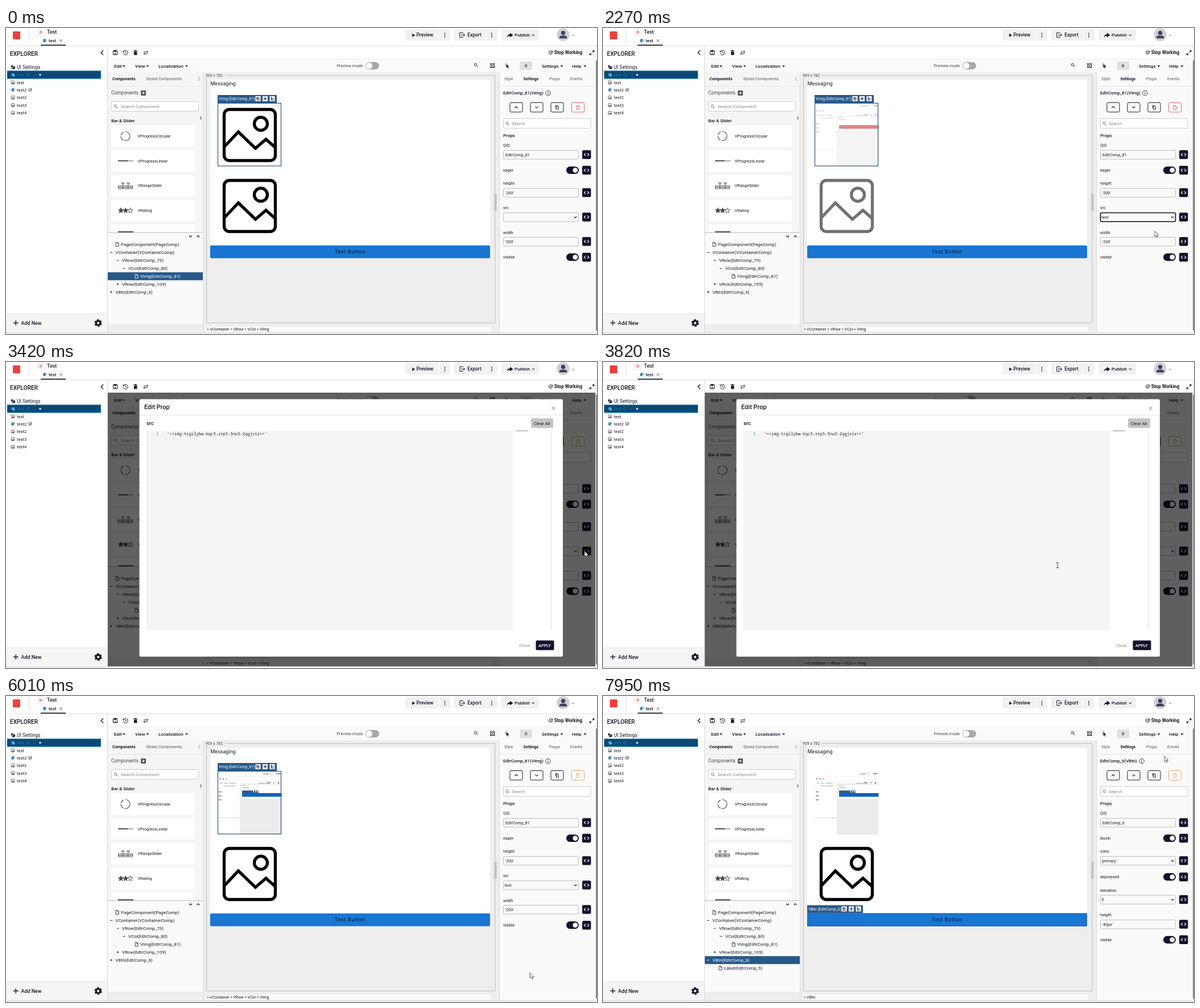
An HTML page that plays this animation: 1039 px wide and 539 px high, repeating every 8 s.

```html
<!DOCTYPE html>
<html lang="en">
<head>
<meta charset="utf-8">
<title>Editor</title>
<style>
html, body { margin: 0; width: 100%; height: 100%; overflow: hidden; background: #fff; }
svg { display: block; width: 100%; height: 100%; font-family: Roboto, sans-serif; --del: #e0605c; }
text { white-space: pre; }
.m { font-weight: 500; }
.b { font-weight: 700; }
</style>
</head>
<body>
<svg id="stage" viewBox="0 0 1039 539" preserveAspectRatio="none"></svg>
<script>
const INK = '#16162a', NAVY = '#11112c', BLUE = '#28598a';
const stage = document.getElementById('stage');

// ---- drawing helpers ----
const R = (x, y, w, h, f, o = '') => `<rect x="${x}" y="${y}" width="${w}" height="${h}" fill="${f}" ${o}/>`;
const box = (x, y, w, h, c, o = '', f = 'none') => R(x, y, w, h, f, `stroke="${c}" ${o}`);
const C = (x, y, r, f, o = '') => `<circle cx="${x}" cy="${y}" r="${r}" fill="${f}" ${o}/>`;
const L = (d, c = INK, w = 1, o = '') => `<path d="${d}" fill="none" stroke="${c}" stroke-width="${w}" ${o}/>`;
const F = (d, f = INK, o = '') => `<path d="${d}" fill="${f}" ${o}/>`;
const esc = s => s.replace(/&/g, '&amp;').replace(/</g, '&lt;').replace(/>/g, '&gt;');
const T = (x, y, s, str, c = INK, o = '') =>
  `<text x="${x}" y="${(y + s * .355).toFixed(2)}" font-size="${s}" fill="${c}" ${o}>${esc(str)}</text>`;
const G = (id, body, o = '') => `<g id="${id}" ${o}>${body}</g>`;
const M = 'class="m"', B = 'class="b"', MONO = 'font-family="Noto Sans Mono, monospace"';
const chev = (x, y, s, up, c = INK, w = 1.1) => L(`M${x - s} ${y + (up ? s / 2 : -s / 2)}l${s} ${up ? -s : s} ${s} ${up ? s : -s}`, c, w);
const caret = (x, y) => F(`M${x - 2.5} ${y - 1}h5l-2.5 2.7z`);
const cross = (x, y, s, c, w = 1) => L(`M${x - s} ${y - s}l${2 * s} ${2 * s}m0 ${-2 * s}l${-2 * s} ${2 * s}`, c, w);
const plus = (x, y, s, c = INK, w = 1.1) => L(`M${x - s} ${y}h${2 * s}M${x} ${y - s}v${2 * s}`, c, w);
const lens = (x, y, c, w = 1) => C(x - 1, y - 1, 2.2, 'none', `stroke="${c}" stroke-width="${w}"`) + L(`M${x + .7} ${y + .7}l2.5 2.5`, c, w);
const palette = (x, y, c) => C(x, y, 3, c) + C(x - 1.2, y - 1, .6, '#fff') + C(x + 1.1, y - 1.1, .6, '#fff') + C(x + 1.8, y + 1.5, 1, '#fff');
const pic = (x, y) => box(x - 2.7, y - 2.7, 5.6, 5.4, '#444', 'rx=".6" stroke-width=".8"') + F(`M${x - 2} ${y + 1.8}l1.4-2 1 1 1-1.4 1.2 2.4z`, '#444');
const dots = (x, y) => [-3, 0, 3].map(d => C(x, y + d, .9, INK)).join('');
const copy = (x, y, s, c) => L(`M${x - s} ${y + s * .5}v${-1.5 * s}h${1.3 * s}`, c, .9) + box(x - s * .5, y - s * .5, s * 1.3, s * 1.6, c, 'stroke-width=".9"');
const bin = (x, y) => `<path d="M${x - 3.2} ${y - 2.6}h6.4M${x - 1} ${y - 3.8}h2M${x - 2.3} ${y - 2.4}v6h4.6v-6" fill="none" style="stroke:var(--del)"/>`;
const sheet = (x, y, c) => L(`M${x - 2.5} ${y - 3.5}h3l2.2 2.2v4.9h-5.2zM${x + .4} ${y - 3.4}v2.3h2.2`, c, .8);

function header() {
  return R(12, 6, 13, 14, '#e8433f', 'rx="1"') + L('M40.5 0V26', '#dcdcdc') +
    box(55.5, 1.5, 11.5, 11.5, '#e2e2e2', 'rx="1"') + C(61.2, 7.2, 3, '#f1aaa5') +
    T(72, 7, 8.9, 'Test', INK, M) + palette(68, 22, '#1b7fc4') + T(75, 22, 7.8, 'test', INK, M) +
    cross(96.5, 22.3, 2.2, '#444', .9) + R(61, 29.4, 44, 1.6, INK) +
    R(702, 2, 79, 20, '#f1f1f1', 'rx="2"') + F('M714.2 9.7v6l4.9-3z') + T(721.5, 12.5, 8.4, 'Preview', INK, M) +
    L('M761.5 2v20', '#fff') + dots(771.5, 12.5) +
    R(788, 2, 76, 20, '#f1f1f1', 'rx="2"') + L('M803 9.5v-1.3h-5.2v8.4h5.2v-1.3M800 12.4h6.5m-2.2-2.2l2.2 2.2-2.2 2.2') +
    T(811.3, 12.5, 8.4, 'Export', INK, M) + L('M844.5 2v20', '#fff') + dots(854, 12.5) +
    R(871, 2, 66, 20, '#f1f1f1', 'rx="2"') + F('M886 8.5l5.5 4-5.5 4v-2.4q-3.6-.2-5.5 2.2.6-4.7 5.5-5.4z') +
    T(894, 12.5, 8.1, 'Publish', INK, M) + chev(927, 12.5, 2.2, 0, '#444') +
    C(979.5, 11.8, 11.2, '#cfcfd3') + C(979.5, 8.8, 3.7, '#3c4063') + F('M972.5 18.3q0-4.8 4.5-4.8h5q4.5 0 4.5 4.8z', '#3c4063') +
    chev(997, 12.8, 2, 0, '#999') + L('M0 31.5H1039', '#dedede');
}

function sidebar() {
  const rows = [[69, 'UI Settings', 8.6], [96, 'test', 7.6], [109, 'test2', 7.6], [122.5, 'test2', 7.6], [136, 'test3', 7.6], [149.5, 'test4', 7.6]];
  return T(7, 45, 10.1, 'EXPLORER', INK, M) + L('M171 39.5l-4 4 4 4', INK, 1.3) +
    R(2, 75.4, 165, 14, '#0a4976') + L('M2 75.9h164.5v13H2', '#0b76b8') +
    palette(12.3, 82.5, '#2b93d6') + T(19, 82.5, 7.6, 'test', '#1c72ab') + C(39, 82.5, 2.5, 'none', 'stroke="#1c72ab"') +
    L('M48 85l4-4.5', '#1c72ab') + C(60, 82.3, 1.6, '#fff') +
    F('M9 66h2.7l1 1h3v1.3h-5l-1.7 3zM10.3 72l1.5-3h5l-1.7 3z') +
    rows.map(([y, s, z], i) => (i ? i == 2 ? palette(12.3, y, '#1b7fc4') : pic(12, y) : '') + T(19, y, z, s)).join('') +
    C(42.3, 109, 2.7, 'none', 'stroke="#333" stroke-width=".8"') + L('M41 109l1.3 1.2 3-3.8', '#333', .9) +
    R(0, 503, 178, 33, '#f5f5f5') + L('M0 503.5H178', '#e4e4e4') + plus(17.3, 519.5, 4.5, INK, 1.3) + T(26.5, 519.7, 8.9, 'Add New', INK, M) +
    C(162, 519.7, 5.4, 'none', `stroke="${INK}" stroke-width="2.4" stroke-dasharray="3.6 2.05"`) +
    C(162, 519.7, 3.6, 'none', `stroke="${INK}" stroke-width="3"`) + L('M178.5 32V536', '#d8d8d8');
}

function toolbar() {
  const menu = [[190, 'Edit', 207.5], [227, 'View', 249], [268, 'Localization', 317.5], [942, 'Settings', 977], [995, 'Help', 1018]];
  return box(188.5, 39.5, 7.2, 7.4, INK, 'rx="1" stroke-width="1.1"') + R(190, 39.5, 4, 2.5, INK) + C(192, 44.8, 1.1, INK) +
    L('M206.7 41.5a4 4 0 1 1-.4 3M206 39.5v2.6h2.6M210.3 41.3v2.5l1.8 1') +
    F('M224.3 40h6.6v1.2h-6.6zM226.3 39h2.6v1h-2.6zM225 42h5.4v5.5h-5.4z') +
    L('M242 42h7.5m-2-2l2 2-2 2M249 45.3h-7m2-2l-2 2 2 2', INK, .9) +
    C(957.5, 43.2, 3.1, 'none', `stroke="${INK}" stroke-width=".9"`) + L('M955.8 43l1.7 1.5 4-4.5') + T(963.7, 43.5, 8.2, 'Stop Working', INK, B) +
    L('M1030.8 42.8l3-3m-2.8 0h2.8v2.8M1029.3 44.3l-3 3m2.8 0h-2.8v-2.8', INK, 1.1) +
    R(179, 54, 857, 24, '#fafafa') + L('M179 54.5H1036', '#ececec') +
    menu.map(([x, s, c]) => T(x, 66.7, 8, s, INK, M) + caret(c, 67)).join('') +
    T(581.5, 66.7, 7.3, 'Preview mode', '#444') + R(632, 60, 24, 13, '#a8a8a8', 'rx="6.5"') + C(638.5, 66.5, 5.5, '#fff') +
    lens(826.5, 65.7, INK, .9) + box(852, 63, 6.5, 6.5, INK) + cross(855.2, 66.3, 4.3, INK, .9) +
    F('M879.5 63.5l5.2 4.2-2.4.3 1.3 2.7-1.2.6-1.3-2.7-1.6 1.7z') + L('M877.5 63l1 .7M879.5 61.5l.3 1.2M877 66h1.2', INK, .8) +
    R(903.5, 59, 21.5, 15, '#e0e0e0', 'rx="2"') + T(912, 66.7, 7.5, '0', INK, M);
}

function library() {
  const cards = [171.5, 215, 259, 302.5, 346].map(y => R(185, y, 147, 38, '#fff', 'rx="3"')).join('');
  const names = ['VProgressCircular', 'VProgressLinear', 'VRangeSlider', 'VRating'].map((s, i) => T(231.5, 190.5 + i * 43.6, 7.2, s)).join('');
  const star = (x, f) => {
    const p = [...Array(10)].map((_, i) => {
      const r = i % 2 ? 2 : 4.8, a = i * Math.PI / 5;
      return (x + r * Math.sin(a)).toFixed(1) + ' ' + (321.5 - r * Math.cos(a)).toFixed(1);
    });
    return F('M' + p.join('L') + 'z', f, 'stroke="#444" stroke-width=".9"');
  };
  return R(179, 78, 167, 282, '#f5f5f5') +
    T(187, 89.5, 7.1, 'Components', INK, B) + T(246.5, 89.5, 7.2, 'Styled Components', '#555') + L('M341 86l-3 3.5 3 3.5', '#888', .9) +
    L('M179 102.5H346', '#e4e4e4') + T(185, 114.5, 8.4, 'Components', '#444') + R(237, 110, 9, 9, '#555', 'rx="1.5"') + plus(241.5, 114.5, 2.6, '#fff') +
    box(185.5, 129.5, 153, 17, '#ccc', 'rx="2"', '#fff') + lens(193.5, 138.5, '#777') + T(201.5, 138.5, 8, 'Search Component', '#888') +
    T(185, 162.7, 7.9, 'Bar & Slider', INK, M) + R(341, 155.5, 3, 6, '#aaa', 'rx="1"') + cards + names +
    C(210, 190.5, 8, 'none', 'stroke="#444" stroke-width="1.1" stroke-dasharray="14 2 9 2 7 3"') +
    L('M197 234H224', '#999', 1.6) + L('M197 234H214', '#444', 1.8) +
    L('M197 280.5h26M197.5 278h8v5h-8zM205.5 278h9v5h-9zM214.5 278h8v5h-8zM203 272.8h5l-2.5 3.5zM212.5 272.8h5l-2.5 3.5z', '#444') +
    star(202, '#444') + star(210.3, '#444') + star(218.6, '#fff') + R(197, 358, 27, 2, '#555');
}

function tree() {
  const rows = [[202, 381, 'PageComponent(PageComp)'], [192.5, 395.3, 'VContainer(VContainerComp)', 0], [204, 409.3, 'VRow(EdtrComp_79)', 0],
    [215, 423.3, 'VCol(EdtrComp_80)', 0], [236, 437.3, 'VImg(EdtrComp_81)'], [204, 451.2, 'VRow(EdtrComp_109)', 1], [192.5, 465.2, 'VBtn(EdtrComp_6)', 1]];
  const row = ([x, y, s, closed], c = INK) => T(x, y, 7.85, s, c) +
    (closed === undefined ? sheet(x - 6.5, y, c) : closed ? plus(x - 7.5, y, 1.9, c, .9) : L(`M${x - 9.5} ${y}h4`, c, .9));
  const hot = r => R(179, r[1] - 7, 167, 14, BLUE) + row(r, '#fff');
  return R(179, 360, 167, 161, '#fafafa') + L('M179 360.5H346', '#bbb') + chev(324.5, 367, 2.5, 0) + chev(338, 367, 2.5, 1) +
    rows.slice(0, 6).map(r => row(r)).join('') + G('btnRow', row(rows[6])) + G('hotImg', hot(rows[4])) +
    G('hotBtn', hot([192.5, 465.2, 'VBtn(EdtrComp_6)', 0]) + row([213, 479.2, 'Label(EdtrComp_9)']));
}

const picture = dy => `<g transform="translate(0 ${dy})" fill="none" stroke="#000" stroke-width="5.3">
  <rect x="383.5" y="143.5" width="90" height="90" rx="9"/><circle cx="448" cy="168.7" r="11.5"/>
  <path d="M384 209L408.5 183 438.5 212 457 196 474 211"/></g>`;

function tag(x, y, w, s, fill, c) {
  const ix = x + w;
  return R(x, y, w, 14, fill) + T(x + 2, y + 7, 6.8, s, c) +
    [33, 20.5, 8].map(d => R(ix - d - 4.5, y + 2, 9, 9, '#fff')).join('') +
    copy(ix - 33, y + 6.5, 2.2, INK) + plus(ix - 20.5, y + 6.5, 3) + L(`M${ix - 10.5} ${y + 4}h2m-1 0v5h4m-4-2.5h4`);
}

function thumb() {
  const tiny = (x, y, s, z = 2.5) => T(x, y, z, s, '#333', M);
  return R(372.5, 133, 112, 111, '#fff') + R(411, 154, 74, 90, '#ececec') + R(413, 156.5, 72, 24, '#fff') +
    R(450, 134, 20, 5.5, '#eee') + tiny(453, 137, 'Preview') + tiny(475, 137, 'Export', 2.8) + L('M373 141.5H485', '#e3e3e3', .5) +
    L('M375 146h2m4 0h2m4 0h1.5', '#b33', 1.5) + L('M373 149.5H485', '#ddd', .5) +
    tiny(376, 152.7, 'Edit    View   Localization') + tiny(444, 152.7, 'Preview mode') + R(459, 151.5, 6, 2.5, '#999', 'rx="1.2"') + cross(471, 152.7, 1, '#333', .6) + L('M478 151.5l2 1.5-2 1', '#333') +
    tiny(382, 158.5, 'Styled Components') + tiny(413, 157, '909 x 782', 2) + tiny(415, 160.8, 'Messaging') +
    [169.5, 176, 183.5].map(y => tiny(374, y, 'Item', 2.6)).join('') + L('M373 214.5H410', '#bbb', .6) + tiny(403, 216, 'v  ^') +
    R(415, 171, 70, 6.5, '#d21f1f', 'id="thumbBtn"') + tiny(444, 174.3, 'Test Button') +
    G('thumbTag', R(415, 166.5, 29, 4.7, BLUE) + [434, 438, 441.5].map(x => R(x, 167.5, 2, 2, '#fff')).join('')) +
    G('thumbTag2', R(414, 163, 36, 4, '#6c8cab')) +
    G('thumbTree', [219.5, 224, 228.5, 233].map((y, i) => tiny(375 + i, y, 'Component(EdtrComp)', 2.8)).join('') + R(373, 234, 37, 4, BLUE) + tiny(378, 240.5, 'Label(EdtrComp_9)', 2.6));
}

function canvas() {
  return R(346, 78, 521, 461, '#eee') + L('M346.5 78V536', '#ddd') + L('M385 83.5H860V519.5H352.5V87', '#bdbdbd') + T(351, 83.3, 6.9, '909 x 782', '#444') +
    R(359, 91, 492, 313, '#fff') + T(359.5, 97.7, 9, 'Messaging') +
    G('photo1', picture(0)) + G('photo2', picture(125)) + G('thumb', thumb(), 'clip-path="url(#thumbClip)"') +
    R(359, 383, 492, 22.6, '#1976d2', 'rx="2"') + T(578, 394, 8.8, 'Test Button', '#0a1420', 'letter-spacing=".78"') +
    G('imgSel', box(372.5, 132.5, 111, 110.5, BLUE, 'stroke-width="1.2"') + tag(372, 118, 104, 'VImg (EdtrComp_81)', BLUE, '#fff')) +
    G('btnHover', box(359.5, 383, 491, 22, '#7fb2e6', 'stroke-dasharray="2 1.5"') + tag(359, 368.5, 98, 'VBtn (EdtrComp_6)', '#7c9ab6', INK)) +
    G('btnSel', box(359.5, 383, 491, 22, BLUE) + tag(359, 368.5, 98, 'VBtn (EdtrComp_6)', BLUE, '#fff')) +
    R(858.5, 292, 1.2, 30, '#aaa') + R(861, 292, 1.2, 30, '#aaa') +
    R(352, 526, 500, 9.5, '#fafafa') + G('pathImg', T(353, 531, 6.95, '> VContainer > VRow > VCol > VImg')) + G('pathBtn', T(353, 531, 6.95, '> VBtn'));
}

function control(kind, y, v) {
  const code = R(1013, y - 7.7, 15.4, 15.4, NAVY, 'rx="2"') + L(`M1019 ${y - 2.3}l-2.6 2.3 2.6 2.3M1022.2 ${y - 2.3}l2.6 2.3-2.6 2.3`, '#fff', 1.1);
  if (kind == 't') return code + R(985, y - 6.6, 22, 13.2, NAVY, 'rx="6.6"') + C(1000.8, y, 4.4, '#fff');
  return code + box(874.5, y - 7.5, 132, 15.5, '#bbb', 'rx="2"', '#fafafa') + T(kind == 's' ? 876.5 : 878, y + .2, 7.1, v) +
    (kind == 's' ? L(`M999 ${y - .8}l2.2 2.2 2.2-2.2`, INK, 1.2) : '');
}

function panel(title, infoX, rows) {
  return T(874, 114.5, 7.75, title, INK, M) + C(infoX, 114.7, 4.3, 'none', `stroke="${INK}" stroke-width=".8"`) + L(`M${infoX} 114v3M${infoX} 112v1`) +
    rows.map(([name, ly, kind, y, v]) => T(874, ly, 7.2, name) + control(kind, y, v)).join('') +
    [886, 922, 958].map(x => box(x, 131.5, 22, 16.5, INK, 'rx="2"', '#fff')).join('') +
    R(994.5, 131.5, 22, 16.5, '#fff', 'rx="2" style="stroke:var(--del)"') + chev(897, 139.7, 2.7, 1) + chev(933, 139.7, 2.7, 0) +
    copy(969, 139.7, 3, INK) + bin(1005.5, 140);
}

function inspector() {
  const tabs = [[876, 'Style'], [909.5, 'Settings'], [955, 'Props'], [992, 'Events']];
  const img = [['QID', 206.5, 'i', 223, 'EdtrComp_81'], ['eager', 250.5, 't', 250.5], ['height', 273.5, 'i', 290, "'200'"],
    ['src', 316.5, 's', 333, ''], ['width', 360, 'i', 376, "'200'"], ['visible', 403.7, 't', 403.7]];
  const btn = [['QID', 206.5, 'i', 223, 'EdtrComp_6'], ['block', 250.5, 't', 250.5], ['color', 273.5, 's', 290, "'primary'"],
    ['depressed', 318.7, 't', 318.7], ['elevation', 342, 's', 358.5, '0'], ['height', 385.5, 'i', 402, "'40px'"], ['visible', 429.3, 't', 429.3]];
  return R(867, 78, 169, 458, '#fafafa') + L('M867.5 78V536', '#d8d8d8') + tabs.map(([x, s], i) => T(x, 89.5, 7.15, s, i == 1 ? INK : '#555', i == 1 ? B : '')).join('') +
    L('M867 102.5H1036', '#e6e6e6') + box(874.5, 159.5, 153.5, 17, '#ccc', 'rx="2"', '#fff') + lens(882, 168.5, '#777') + T(889, 168.5, 7.6, 'Search', '#888') +
    T(874, 189.5, 7.9, 'Props', INK, M) +
    G('panelImg', panel('EdtrComp_81(VImg)', 953, img)) + G('srcVal', T(876.5, 333.2, 7.1, 'test')) +
    G('srcFocus', box(874.5, 325.5, 132, 15.5, '#111', 'rx="2" stroke-width="1.6"')) +
    G('panelBtn', panel('EdtrComp_6(VBtn)', 947, btn));
}

const ITEM = 10.4, LIST_Y = 341.8;
const list = () => G('list', box(874.5, LIST_Y, 132, ITEM * 5, '#888', 'stroke-width=".8"', '#fff') + R(875, 0, 131, ITEM, '#1e6fd0', 'id="listHot"') +
  ['', 'test', 'test2', 'test3', 'test4'].map((s, i) => T(876.5, LIST_Y + ITEM * (i + .5), 7.1, s, INK, `id="opt${i}"`)).join(''));

const toast = () => '<g clip-path="url(#toastClip)">' + G('toast',
  R(858.5, 65.5, 165, 48.5, '#35c96c', 'rx="3" opacity=".92" style="filter:drop-shadow(0 1px 3px rgba(0,0,0,.25))"') +
  C(879.7, 91, 6.6, '#0c1f14') + L('M876.7 91l2.2 2.3 4-4.3', '#35c96c', 1.5) + T(893.5, 82, 8.2, 'Code Saved', '#0c1f14', B) +
  T(893.5, 96.3, 8.3, 'Property has been changed', '#0c1f14') + cross(1006, 90.5, 2.7, '#1c8445', 1.3) + R(858.5, 111, 165, 3, '#d3f5df', 'id="bar"')) + '</g>';

function modal() {
  return G('shade', R(179, 54, 857, 482, '#000')) + G('modal',
    R(234.5, 65.4, 744.5, 453.6, '#fff', 'rx="2.5"') + T(243, 79.2, 11, 'Edit Prop', INK, M) + cross(962.5, 81.5, 2.8, '#777') + L('M235 93.5H979', '#e4e4e4') +
    T(247, 107.5, 9.4, 'src', INK, M) + R(923, 99.3, 39, 17, '#c4c4c4', 'rx="2"') + T(928, 108.2, 7.7, 'Clear All') +
    R(247, 121, 644, 351.5, '#f4f4f4') + T(264, 126.5, 7.1, '1', '#237893', MONO) +
    T(283, 126.3, 7.15, "'<<img:tcgilybw-kqc5-zrp5-5nu5-2qgjvir>>'", '#222', MONO) +
    R(896, 120.7, 22, 1, '#888') + L('M958.5 121V472', '#ddd') +
    G('lineHot', L('M280 121.5H891M280 131H891', '#e2e2e2') + R(959, 121, 7.5, 1.3, '#333')) + R(459.3, 121.5, 1, 9.5, '#000', 'id="caret"') +
    T(902, 499.7, 7.7, 'Close', '#888') + R(931.5, 490.5, 32, 17, NAVY, 'rx="2"') + T(936, 499.5, 7.4, 'APPLY', '#fff', M));
}

const cursors = () => G('arrow', F('M0 0V9.6L2.3 7.5 3.9 11 5.4 10.3 3.9 7H7z', '#fff', 'stroke="#333" stroke-width=".8"')) +
  G('hand', F('M-1 .8q1-1.2 2 0V4.3l3.6.9q1 .4.9 1.6L5 9.5 4.3 11.5H-.5L-3.2 7.5q.3-1.3 2.2.2z', '#fff', 'stroke="#222" stroke-width=".8"')) +
  G('beam', L('M-2.3-4.5H-.6L0-4 .6-4.5H2.3M0-4V4M-2.3 4.5H-.6L0 4 .6 4.5H2.3', '#333', .9));

stage.innerHTML = `<defs><clipPath id="thumbClip"><rect x="372" y="132.5" width="112.5" height="111.5"/></clipPath>
  <clipPath id="toastClip"><rect x="850" y="60" width="185" height="60"/></clipPath></defs>` +
  R(0, 0, 1039, 539, '#fff') + header() + toolbar() + library() + R(179, 521, 167, 15, '#eee') + canvas() + tree() + inspector() + sidebar() +
  R(0, 536, 1039, 3, '#f0f0f0') + L('M0 536.5H1039', '#dcdcdc') + R(1036, 32, 3, 507, '#f3f3f3') + R(1037, 57, 2, 476, '#888', 'rx="1"') +
  list() + toast() + modal() + cursors();

// ---- timeline ----
const el = {};
stage.querySelectorAll('[id]').forEach(n => el[n.id] = n);
const show = (id, on) => el[id].setAttribute('visibility', on ? 'visible' : 'hidden');
const fade = (id, o) => { show(id, o > 0); el[id].setAttribute('opacity', o); };
const span = (t, a, b) => Math.min(1, Math.max(0, (t - a) / (b - a)));
const ease = k => k * k * (3 - 2 * k);

// start, end, from, control, to
const moves = [
  [280, 920, [1007, 539], [985, 420], [1000, 333]],
  [1460, 1800, [1000, 333], [984, 348], [970, 358]],
  [2330, 3020, [970, 358], [992, 350], [1017, 333]],
  [3420, 3820, [1017, 333], [900, 362], [799, 358]],
  [4300, 4930, [799, 358], [880, 425], [946, 503]],
  [5850, 6520, [946, 503], [860, 450], [780, 396]],
  [7310, 7950, [780, 396], [1030, 230], [987, 106]]
];

function pointer(t) {
  const m = moves.filter(v => v[0] <= t).pop() || moves[0];
  const k = ease(span(t, m[0], m[1]));
  return [0, 1].map(i => (1 - k) ** 2 * m[2][i] + 2 * k * (1 - k) * m[3][i] + k * k * m[4][i]);
}

function update(t) {
  const [x, y] = pointer(t);
  const dialog = t >= 3180 && t < 5390, picked = t >= 6700;

  const shape = t < 280 ? '' : dialog
    ? (x < 891 && y < 472 && x > 247 ? 'beam' : x > 931 && x < 963 && y > 490 ? 'hand' : 'arrow')
    : (t > 2330 && t < 3180 && x > 1012 ? 'hand' : 'arrow');
  for (const id of ['arrow', 'hand', 'beam']) {
    show(id, id == shape);
    el[id].setAttribute('transform', `translate(${x.toFixed(2)} ${y.toFixed(2)})`);
  }

  const hot = Math.min(4, Math.max(0, Math.floor((y - LIST_Y) / ITEM)));
  show('list', t >= 1110 && t < 1990);
  el.listHot.setAttribute('y', LIST_Y + hot * ITEM);
  for (let i = 0; i < 5; i++) el['opt' + i].setAttribute('fill', i == hot ? '#fff' : INK);
  show('srcFocus', t >= 1110 && t < 3180);
  show('srcVal', t >= 1990 && !picked);

  const load = t < 2270 ? 0 : .55 + .45 * span(t, 2270, 2450);
  const blue = t >= 5390;
  fade('photo1', t < 2050 ? 1 : 0);
  fade('photo2', t < 2050 ? 1 : load);
  fade('thumb', load);
  el.thumbBtn.setAttribute('fill', blue ? '#0d63bd' : '#d21f1f');
  show('thumbTag', t >= 2600);
  show('thumbTree', t >= 2800 && !blue);
  show('thumbTag2', t >= 6200 && t < 7400);

  const over = y > 383 && y < 405 && x < 851;
  show('btnHover', t >= 5850 && t < 7160 && over);
  show('btnSel', t >= 7160);
  show('imgSel', t < 7160);
  show('hotImg', t < 1110);
  show('hotBtn', picked);
  show('btnRow', !picked);
  show('pathImg', !picked);
  show('pathBtn', picked);
  show('panelImg', !picked);
  show('panelBtn', picked);
  stage.style.setProperty('--del', t < 3180 ? '#e0605c' : '#e6a35c');

  const slide = 1 - (1 - span(t, 2390, 2720)) ** 3;
  fade('toast', t < 2390 ? 0 : 1 - span(t, 3180, 3320));
  el.toast.setAttribute('transform', `translate(${(1 - slide) * 180} 0)`);
  el.bar.setAttribute('width', 165 * (1 - span(t, 2300, 3170)));

  const open = dialog ? ease(span(t, 3150, 3380)) : 0, s = .9 + .1 * open;
  fade('shade', open * .62);
  fade('modal', open);
  el.modal.setAttribute('transform', `translate(${607 * (1 - s)} ${292 * (1 - s)}) scale(${s})`);
  show('lineHot', dialog && t >= 4280);
  show('caret', dialog && t >= 4280 && t < 4800);
}

const t0 = performance.now();
function tick() {
  update((performance.now() - t0) % 8000);
  requestAnimationFrame(tick);
}
tick();
</script>
</body>
</html>
```
